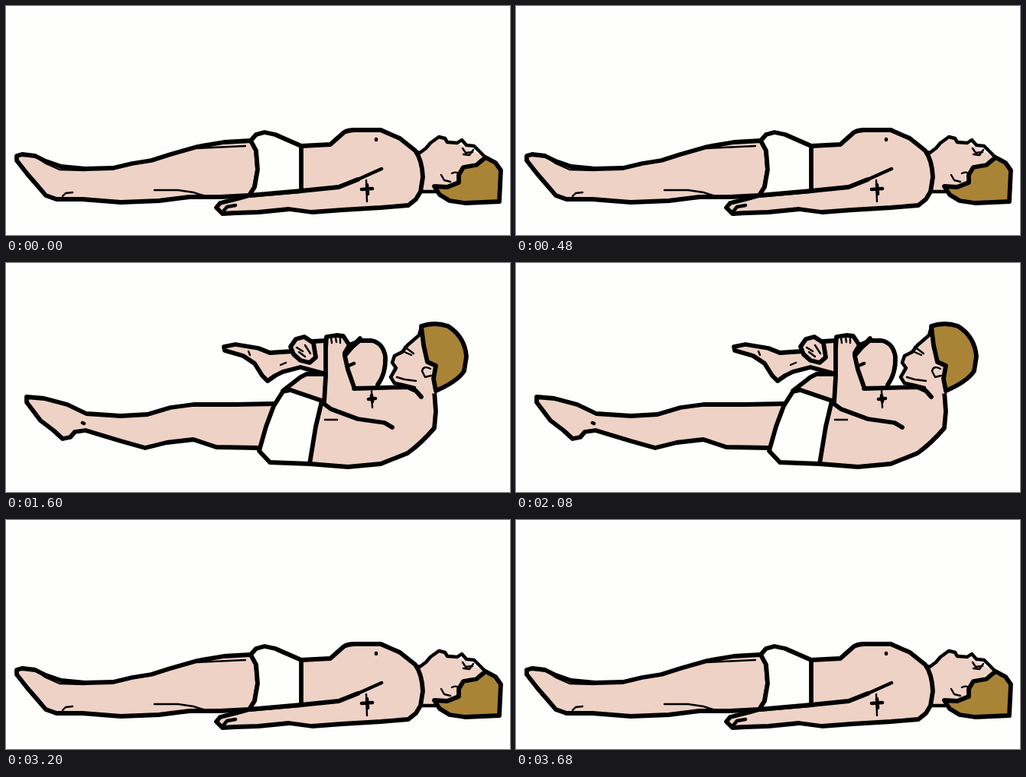
Recreate the animation shown at these times as an HTML page. Size 659 by 301 pixels, loop 4 s.

```html
<!DOCTYPE html>
<html lang="en">
<head>
<meta charset="utf-8">
<title>Knee to chest exercise</title>
<style>
  html, body { margin: 0; width: 100%; height: 100%; overflow: hidden; background: #fefefd; }
  svg { display: block; width: 100%; height: 100%; }
  path { fill: #eed2c6; stroke: #000; stroke-width: 5.8; stroke-linejoin: round; stroke-linecap: round; }
  .line, .mid, .thin { fill: none; }
  .mid { stroke-width: 4.5; }
  .thin { stroke-width: 2.4; }
  .skin { stroke: none; }
  .brief { fill: #fefefd; }
  .hair { fill: #a98436; }
  g { display: none; }
  g.on { display: inline; }
</style>
</head>
<body>
<svg viewBox="0 0 659 301">
  <!-- resting -->
  <g class="on">
    <path d="M320 177L285 179 250 185 215 195 190 203 165 207 140 213 103 214 72 211 52 204 38 197 21 195 14 197 14 203 28 221 41 236 52 249 66 254 100 254 150 258 200 256 240 251 280 251 318 249 325 238 329 215 327 190Z"/>
    <path class="thin" d="M39 198L52 207 70 215 103 216M74 250L78 246 87 245M194 242L225 242 245 245 261 250M250 187L313 184"/>
    <path class="skin" d="M541 193L549 187 566 172 590 180 627 199 597 213 590 233 562 244 543 244Z"/>
    <path class="hair" d="M627 199L640 206 647 216 645 257 600 259 580 256 567 248 560 237 577 238 592 232 592 222 598 212 615 209Z"/>
    <path class="mid" d="M528 190L541 193 549 187 555 180 566 172 574 174 577 179 590 180 596 176 602 183 612 184 620 192 627 199M543 244L562 244"/>
    <path d="M386 184L424 182 442 166Q448 163 455 163L490 163 515 174 535 190Q544 202 545 225L542 244 536 254 526 262 490 265 440 268 400 271 370 267 330 271 300 272 283 273 275 265 280 259 300 254 318 249 386 243"/>
    <path class="brief" d="M320 177L327 169 338 166 352 169 386 184 386 243 318 249 325 238 329 215 327 190Z"/>
    <path class="line" d="M386 243L435 238 460 228"/>
    <path class="mid" d="M460 228L491 214M284 270L289 264 300 262M472 235L473 247M465 241L479 240M484 175L484 176"/>
    <path class="thin" d="M471 229L472 257M569 222L573 229 581 231M583 220Q592 216 592 224M597 187L601 193 610 192M598 195L606 196 611 189"/>
  </g>
  <!-- head and feet shifted -->
  <g>
    <path class="skin" d="M190 195L230 185 295 171 318 172 328 188 334 215 328 247 250 230Z"/>
    <path class="mid" d="M190 194L212 190 238 183 265 176 295 171 318 172"/>
    <path d="M318 181L300 182 260 184 240 189 215 192 175 197 152 203 120 203 90 199 65 190 45 187 30 184 10 186 10 195 30 215 50 232 64 238 78 237 86 231 110 236 150 247 200 247 260 250 328 247"/>
    <path class="thin" d="M63 219L66 226 77 228M194 244L205 240 235 240 245 245"/>
    <path class="skin" d="M548 196L546 188 582 182 594 192 621 203 600 222 603 242 576 251 550 249Z"/>
    <path class="hair" d="M621 203L638 210 647 222 645 262 625 268 600 267 578 264 572 260 576 250 590 249 602 245 603 236 597 229 598 222 608 215Z"/>
    <path class="mid" d="M548 222L552 210 548 197 546 188 562 188 568 184 578 186 582 182 588 184 594 192 604 191 612 197 621 203M550 249L576 250"/>
    <path d="M394 179L410 178 430 169 455 164 490 165 503 169 520 184 535 197 546 212 550 228 548 250 542 262 525 268 500 273 440 273 400 270 350 267 300 267 287 263 280 256 290 251 318 249 328 242 392 240"/>
    <path class="brief" d="M318 178L323 165 337 161 352 166 394 181 392 240 328 242 333 225 333 205 328 188Z"/>
    <path class="line" d="M328 242L318 249M392 240L432 238M433 247L460 230L495 214"/>
    <path class="mid" d="M477 234L478 245M472 240L484 239M490 180L491 180"/>
    <path class="thin" d="M478 231L478 254M554 212L558 220 573 223M594 198L603 197M596 203L604 206M583 235Q587 228 594 233L595 240 588 242M565 188L568 194"/>
  </g>
  <!-- knee held to chest -->
  <g>
    <path d="M350 185L300 186 245 186 215 190 185 199 150 201 105 198 80 186 50 178 27 176 27 183 45 207 62 220 74 231 84 229 90 222 104 220 150 234 182 243 210 236 245 232 275 242 331 243"/>
    <path class="skin" d="M543 163L455 165 442 115 449 108 443 97 420 97 418 150 413 183 397 264 447 268 490 264 525 250 545 233 560 215 562 195 560 165Z"/>
    <path class="skin" d="M362 168L393 146 385 137 402 105 450 108 460 165 418 192Z"/>
    <path d="M375 116L345 118 330 112 300 107 285 110 286 115 310 122 325 132 335 148 342 155 352 148 362 143 385 137 415 145"/>
    <path d="M455 163L447 140 443 122 453 110 462 102 478 102Q493 105 496 123Q497 145 486 160"/>
    <path class="line" d="M362 168L385 150 393 146 415 146M418 105L418 150 416 183M402 103L418 102M463 99L443 120M413 183L425 192 460 205 495 210 505 216"/>
    <path d="M385 128L376 120 372 110 379 100 390 97 402 105 405 124 397 131Z"/>
    <path d="M418 112L419 97 432 95 441 96 449 108 443 118"/>
    <path class="line" d="M449 108L461 103M455 165L525 163 536 168 543 176M397 264L447 268 490 264 525 250Q543 237 560 217L562 195 560 168"/>
    <path class="brief" d="M362 169L372 167 413 181 405 215 397 264 345 262 331 247 340 215 350 188Z"/>
    <path class="skin" d="M545 83L540 95 508 122 503 150 508 158 535 164 560 172 565 140Z"/>
    <path class="hair" d="M543 83Q560 77 578 83Q600 97 602 123L599 142Q590 156 562 168L559 152 562 135 551 130 546 108Z"/>
    <path class="mid" d="M543 84L540 95 525 108 518 117 508 122 505 131 510 138 503 150 508 158 518 160 534 164M478 174L479 182M474 179L483 178M448 135L455 132M100 210L102 211"/>
    <path class="thin" d="M380 111L388 116M383 117L391 123M391 108L398 119M425 98L426 105M431 98L432 104M437 99L437 105M317 116L319 121M359 134L366 131M478 168L479 190M417 206L433 206M511 150L521 153 536 155M521 110L533 119M521 117L530 121M555 139Q546 134 544 142L548 150 556 148"/>
  </g>
</svg>
<script>
  const poses = document.querySelectorAll("g");
  const order = [0, 1, 2, 1, 0];
  const hold = 800;
  const start = performance.now();

  function draw() {
    const step = Math.floor((performance.now() - start) / hold) % order.length;
    poses.forEach((pose, i) => pose.classList.toggle("on", i === order[step]));
    requestAnimationFrame(draw);
  }
  draw();
</script>
</body>
</html>
```
